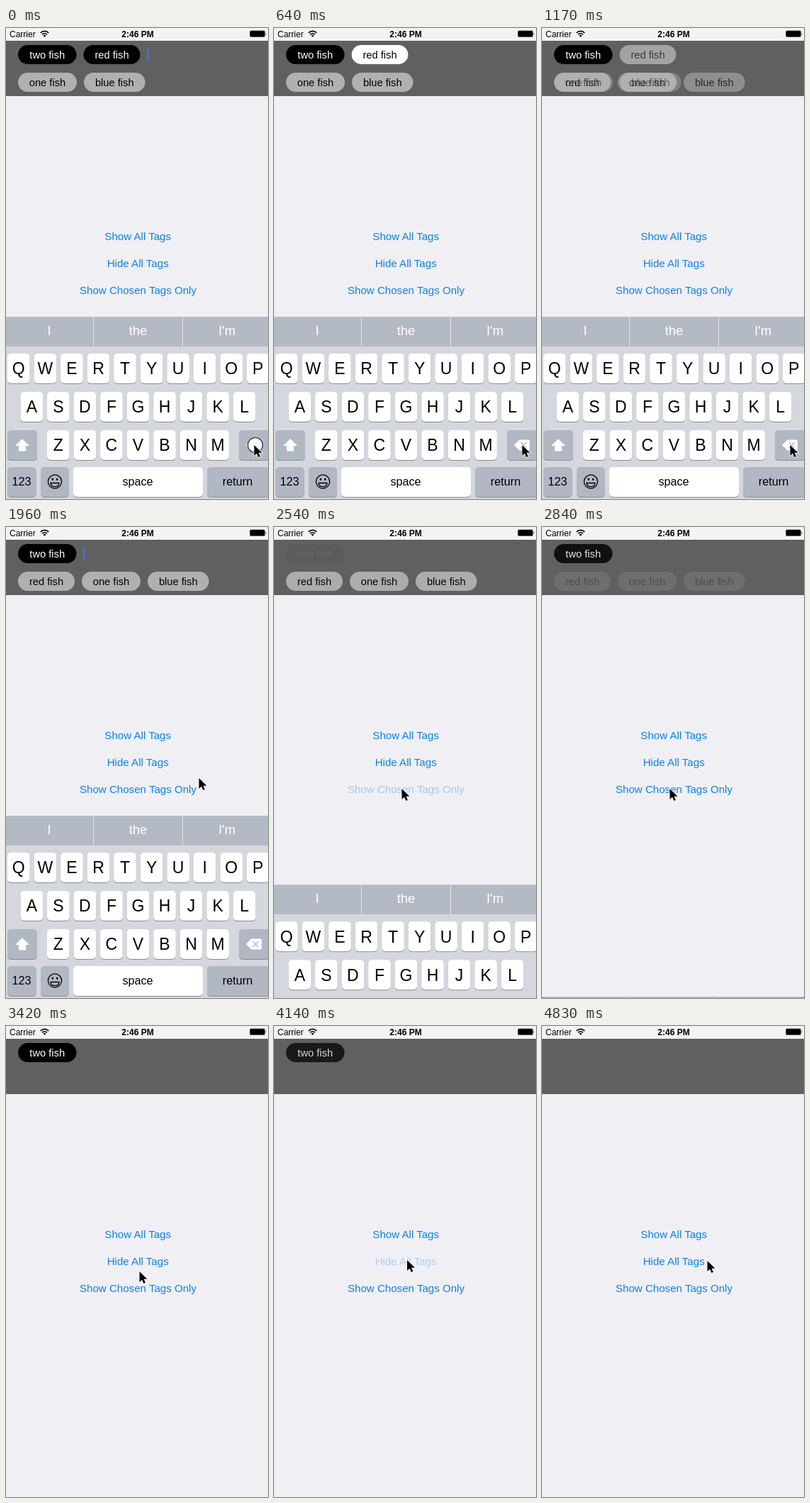
An HTML page that plays this animation: 370 by 664 pixels, repeating every 4.93 s.

```html
<!DOCTYPE html>
<html lang="en">
<head>
<meta charset="utf-8">
<title>Tag picker</title>
<style>
html, body { margin: 0; width: 100%; height: 100%; overflow: hidden; background: #f0eff4; }
svg { display: block; font-family: "Liberation Sans", Arial, sans-serif; }
.mid { text-anchor: middle; }
.link { font-size: 15.1px; fill: #0a80f5; }
.tag { font-size: 14.7px; }
.letter { font-size: 23px; }
.label { font-size: 16.2px; }
.word { font-size: 18.5px; fill: #fff; }
</style>
</head>
<body>
<svg id="stage" width="370" height="664" viewBox="0 0 370 664"></svg>
<script>
const LOOP = 4930;
const BAR = '#606060', GREY_KEY = '#b1b8c3', GREY_TAG = '#b0b0b0';

const text = (x, y, s, cls, extra = '') => `<text class="mid ${cls}" x="${x}" y="${y}" ${extra}>${s}</text>`;
const rect = (x, y, w, h, fill, extra = '') => `<rect x="${x}" y="${y}" width="${w}" height="${h}" fill="${fill}" ${extra}/>`;
const tag = (x, y, w, s, fill, ink) =>
  rect(x, y, w, 27, fill, 'rx="13.5"') + text(x + w / 2, y + 18.8, s, 'tag', `fill="${ink}"`);
const key = (x, y, w, fill = '#fff', id = '') =>
  rect(x, y + 1, w, 42, '#888c92', 'rx="5"') + rect(x, y, w, 42, fill, `rx="5" ${id}`);

const letterRow = (s, x, y) => [...s].map((c, i) => {
  const left = x + i * 37.55;
  return key(left, y, 31.6) + text(left + 15.8, y + 29.3, c, 'letter');
}).join('');

const statusBar = `
  ${rect(0, 0, 370, 18, '#f3f3f4')}
  <text x="5" y="12.6" font-size="12">Carrier</text>
  ${text(186, 12.6, '2:46 PM', '', 'font-size="12" font-weight="bold"')}
  <path d="M48.8 6.8a8 8 0 0 1 11.4 0M51 9.2a5 5 0 0 1 7 0" fill="none" stroke="#000" stroke-width="1.7"/>
  <path d="M54.5 12.8l-2-2.1a3 3 0 0 1 4 0z"/>
  <rect x="344.5" y="3.9" width="21" height="8.6" rx="1.5" fill="#000" stroke="#555" stroke-width=".8"/>
  <path d="M366.6 6.5q1.8 1.7 0 3.4z"/>`;

const keyboard = `
  ${rect(0, 407, 370, 42, '#b3bac4')}
  ${rect(0, 449, 370, 215, '#d4d8de')}
  ${rect(123, 407, 1, 42, '#e0e3e7')}${rect(249, 407, 1, 42, '#e0e3e7')}
  ${text(61, 433, 'I', 'word')}${text(186.5, 433, 'the', 'word')}${text(312, 433, "I'm", 'word')}
  ${letterRow('QWERTYUIOP', 2, 459)}
  ${letterRow('ASDFGHJKL', 20.5, 513)}
  ${letterRow('ZXCVBNM', 58, 567)}
  ${key(2, 567, 42, GREY_KEY)}
  <path d="M23 579l10 10h-5v7.5h-10V589h-5z" fill="#fff"/>
  ${key(329, 567, 43, GREY_KEY, 'id="del"')}
  <path id="delIcon" d="M346.5 580.5h12.5q2 0 2 2v11q0 2-2 2h-12.5l-7.5-7.5z" fill="#fff"/>
  <path d="M348.5 584l8 8m0-8l-8 8" stroke="${GREY_KEY}" stroke-width="1.4"/>
  ${key(2, 619, 40.5, GREY_KEY)}${text(22, 645, '123', 'label', 'font-size="15.6"')}
  ${key(49, 619, 40, GREY_KEY)}
  <g fill="none" stroke="#000" stroke-width="1.3">
    <circle cx="69" cy="639.5" r="9.6"/>
    <path d="M63 641.5h12a6 5.2 0 0 1-12 0z"/>
  </g>
  <ellipse cx="65.8" cy="636.3" rx="1.2" ry="1.8"/><ellipse cx="72.2" cy="636.3" rx="1.2" ry="1.8"/>
  ${key(95, 619, 183)}${text(186, 645, 'space', 'label')}
  ${key(284, 619, 88, GREY_KEY)}${text(327, 645, 'return', 'label')}`;

stage.innerHTML = `
  ${rect(0, 0, 370, 664, '#f0eff4')}
  ${statusBar}
  ${rect(0, 18, 370, 78, BAR)}
  <g id="redTag">
    ${tag(109.5, 24, 80, 'red fish', '#000', '#fff')}
    <g id="redPicked">${tag(109.5, 24, 80, 'red fish', '#fff', '#000')}</g>
  </g>
  <g id="twoTag">${tag(17, 24, 82.5, 'two fish', '#000', '#fff')}</g>
  <g id="pool">
    ${tag(17, 63, 83, 'one fish', GREY_TAG, '#000')}
    ${tag(110, 63, 86.5, 'blue fish', GREY_TAG, '#000')}
    <g id="poolNext">
      ${rect(10, 62, 300, 29, BAR)}
      ${tag(17, 63, 80, 'red fish', GREY_TAG, '#000')}
      ${tag(107, 63, 83, 'one fish', GREY_TAG, '#000')}
      ${tag(200, 63, 86.5, 'blue fish', GREY_TAG, '#000')}
    </g>
  </g>
  ${rect(0, 28, 2, 18, '#4b70e6', 'id="caret"')}
  ${text(186.2, 299.3, 'Show All Tags', 'link')}
  ${text(186.2, 337.3, 'Hide All Tags', 'link', 'id="hide"')}
  ${text(186.5, 375.3, 'Show Chosen Tags Only', 'link', 'id="chosen"')}
  <g id="keys">${keyboard}</g>
  <g id="mouse">
    <circle id="ring" cx="2" r="10.5" fill="#fff" fill-opacity=".85" stroke="#222" stroke-width="1.1"/>
    <path d="M.5 0v15l3.5-3.3 2.4 5.3 2.5-1.1-2.3-5.2h4.9z" stroke="#fff" stroke-width="1.6" paint-order="stroke"/>
  </g>`;

const el = id => document.getElementById(id);
const fade = (id, a) => el(id).setAttribute('opacity', a);
const clamp = v => Math.min(1, Math.max(0, v));
const linear = (t, a, b) => clamp((t - a) / (b - a));
const ease = (t, a, b) => { const p = linear(t, a, b); return p * p * (3 - 2 * p); };
const within = (t, [a, b]) => t >= a && t < b;

const presses = [[0, 100], [880, 1000], [2410, 2490], [4010, 4110]];

// time, x, y of the pointer tip
const path = [
  [0, 350, 588], [1290, 350, 588], [1390, 328, 473], [1600, 302, 412], [1800, 281, 369],
  [1940, 272, 354], [1990, 272, 354], [2150, 222, 362], [2340, 180, 369], [3200, 180, 369],
  [3420, 188, 346], [3660, 187.5, 330], [4710, 187.5, 330], [4770, 206, 330], [4830, 233, 331], [LOOP, 233, 331]
];

function pointer(t) {
  const i = path.findIndex(p => p[0] > t);
  const [a, b] = [path[i - 1], path[i]];
  const k = linear(t, a[0], b[0]);
  return [a[1] + (b[1] - a[1]) * k, a[2] + (b[2] - a[2]) * k];
}

// critically damped spring used by the keyboard
function slide(t) {
  if (t < 2500) return 0;
  const x = (t - 2469) * 0.01826;
  return 257 * (1 - (1 + x) * Math.exp(-x)) + ease(t, 2800, 3010) * 3;
}

function caretAlpha(t) {
  if (t < 100) return 1;
  if (t < 1400 || t >= 2500) return 0;
  return t < 1800 ? 1 - ease(t, 1580, 1700) : ease(t, 1820, 1920) - ease(t, 2230, 2400);
}

const buttonAlpha = (t, [down, up]) => t < down ? 1 : 0.2 + 0.8 * linear(t, up, up + 280);

function draw() {
  const t = performance.now() % LOOP;
  const swap = ease(t, 900, 1390);
  fade('redPicked', ease(t, 100, 640));
  fade('redTag', 1 - swap);
  fade('poolNext', swap);
  fade('pool', t < 2500 ? 1 : 1 - ease(t, 2475, 2975));
  fade('twoTag', t < 2500 ? 1 : ease(t, 2475, 2975) - ease(t, 3990, 4430));
  fade('caret', caretAlpha(t));
  el('caret').setAttribute('x', t < 880 ? 199.5 : 109.5);
  fade('chosen', buttonAlpha(t, presses[2]));
  fade('hide', buttonAlpha(t, presses[3]));
  el('keys').setAttribute('transform', `translate(0 ${slide(t)})`);
  const held = within(t, presses[1]);
  el('del').setAttribute('fill', held ? '#fff' : GREY_KEY);
  el('delIcon').setAttribute('fill', held ? '#222' : '#fff');
  fade('ring', presses.some(p => within(t, p)) ? 1 : 0);
  el('mouse').setAttribute('transform', `translate(${pointer(t)})`);
  requestAnimationFrame(draw);
}
draw();
</script>
</body>
</html>
```
